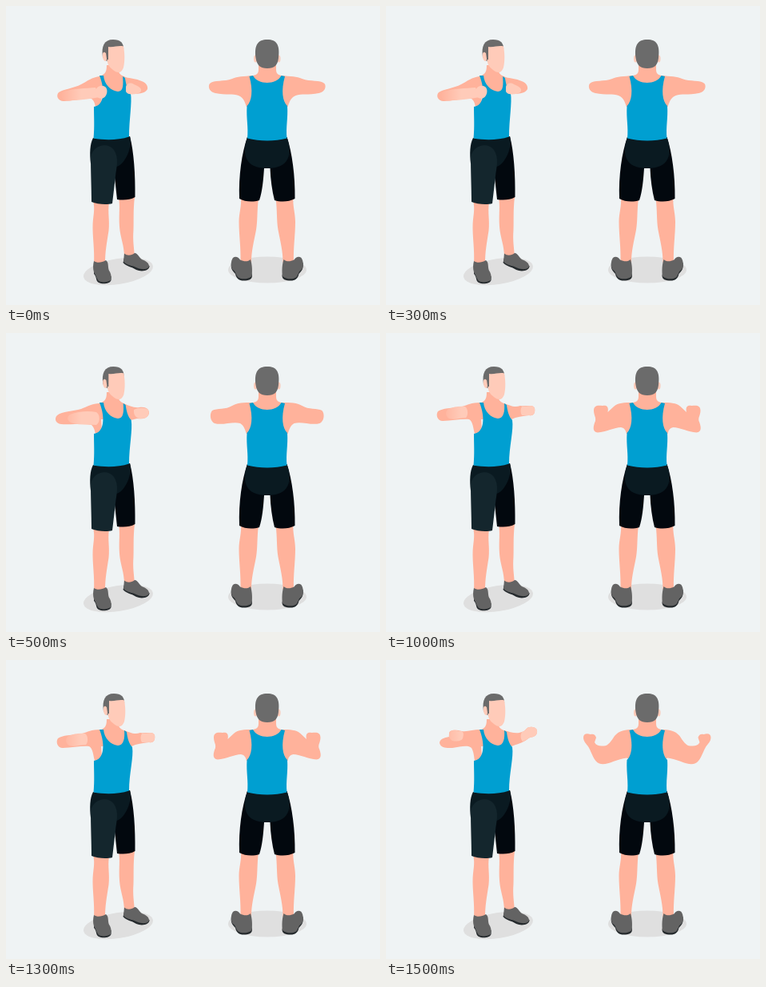
Animation of 468 by 374 pixels, one loop 2 s. Source, as an HTML page:

```html
<!DOCTYPE html>
<html lang="en">
<head>
<meta charset="utf-8">
<title>Elbow swing exercise</title>
<style>
html, body { margin: 0; width: 100%; height: 100%; overflow: hidden; background: #eff3f4; }
svg { display: block; width: 100vw; height: 100vh; }
.skin { fill: #ffb29b; }
.light { fill: #ffcbb9; }
.hair { fill: #6b6b6b; }
.shirt { fill: #009fd1; }
.dark { fill: #02080e; }
.band { fill: #0a1a21; }
.thigh { fill: #14262d; }
.shade { fill: #dfdfdf; }
.shoe { fill: #636363; }
.sole { fill: #252a2d; }
</style>
</head>
<body>
<svg viewBox="0 0 468 374">
  <defs>
    <linearGradient id="fade" gradientUnits="userSpaceOnUse" x1="68" y1="0" x2="94" y2="0">
      <stop offset="0" stop-color="#ffb29b"/><stop offset="1" stop-color="#ffcbb9"/>
    </linearGradient>
    <g id="backLeg">
      <path class="skin" d="M294 239L316 240C314 256 315 268 313 280C310 296 307 306 307 321L293.500 319C294 302 291.500 286 291.500 270C291.500 259 295 250 294 239Z"/>
      <path class="sole" d="M282 321C281 328 283 331 287 335C288 341 292 343.500 297 343.500C304 343.500 308 342 308 337L306 330Z"/>
      <path class="shoe" d="M284 315C287 312.500 291 314 293 317.500C298 320 303 320 306 317C308 323 308.500 332 307.500 338C303 342 294 342.500 290 339C287 335 288 333 284 330C281 327 281 319 284 315Z"/>
    </g>
    <path id="backArm" class="skin"/>
  </defs>

  <g id="front">
    <ellipse class="shade" cx="140.500" cy="332" rx="44" ry="16" transform="rotate(-9 140.500 332)"/>
    <path class="skin" d="M141 239H161C159 255 160 268 159.500 280C158.500 293 160 301 161 313L148 314C148 299 143 290 142 276C141 260 143 251 141 239Z"/>
    <path class="skin" d="M109 244L129 246C127 258 130 268 128.500 281C126 297 124 308 124 322L110 322C111 306 108.500 291 108.500 277C108.500 263 112 255 109 244Z"/>
    <path class="sole" d="M148 315L146.500 321C151 326 157 326 163 330C170 333 180 331 179.500 325Z"/>
    <path class="shoe" d="M148 309.500C152 313 157 312 161 309C165 309.500 166 314 170 317C175 319 179 321 179 326C177 330 170 330 164 327.500C158 324 151 325 147 319.500Z"/>
    <path class="sole" d="M110 330V335C114 339 112 344 116 346C121 348.500 130 347.500 131.500 343V338Z"/>
    <path class="shoe" d="M110 319C114 322 120 321 125 318C129 321 127 326 129 331C132 335 132 340 131 343C127 346 119 346 116 344C113 341 113 337 110 333C108.500 328 109 323 110 319Z"/>

    <path class="dark" d="M112 165L155 163C160 182 162 212 161.500 239C155 243 146 243 139 242L135 205Z"/>
    <path class="band" d="M109 165C122 168 142 167 155 163C157 170 155 182 150 190C147 195 143 200 138 201L106 197C104.500 185 105 172 109 165Z"/>
    <path class="thigh" d="M106 189C109 173 128 170 135 180C142 190 138 203 137 213L133 247C126 249 114 248 107 245C107 228 106 207 106 189Z"/>

    <path id="farArm" class="skin"/>
    <path id="nearArm" class="skin"/>
    <path class="skin" d="M126 74H141V82C142 86 146 87 151 90L153 108H118L116 88C123 86 126 84 126 74Z"/>
    <path id="vest" class="shirt"/>
    <path id="farHand" class="light"/>
    <path id="nearHand" fill="url(#fade)"/>
    <path id="fist" class="light"/>

    <g id="head">
      <path class="hair" d="M121 64C119 50 123 42 134 42C143 42 148 46 147 56L130 67L126 69Z"/>
      <path class="light" d="M128 51C135 52 141 49 147 50.500C148.500 58 149 69 147 77C144 85 139 84 134 80C129 76 127 73 126.500 67H128Z"/>
      <path class="light" d="M125 59C121 55 120 61 121.500 66C123 70 125.500 70 126 66Z"/>
    </g>
  </g>

  <g id="back">
    <ellipse class="shade" cx="327" cy="330" rx="49" ry="16.500"/>
    <use href="#backLeg"/>
    <use href="#backLeg" transform="matrix(-1 0 0 1 653.500 0)"/>
    <path class="dark" d="M302 164H351.500C358 183 362 213 361.500 241C354 245 344 245.500 336 243C333 231 331 217 330.500 203H323C322 217 321 231 317 243C309 245.500 299 245 292 241C291 212 295 184 302 164Z"/>
    <path class="band" d="M302 164H351.500C359 186 354 203 327 203C299 203 295 186 302 164Z"/>
    <use href="#backArm"/>
    <use href="#backArm" transform="matrix(-1 0 0 1 653.500 0)"/>
    <path class="skin" d="M316 70H338V80C338 86 343 87 349 88V104H304V88C311 87 316 86 316 80Z"/>
    <path class="shirt" d="M304.500 88L309 87C315 99 338.500 99 344.500 87L349 88C344 106 346 119 352 125C353 141 350 151 351.500 165.500C336 169.500 318 169.500 302 165.500C303.500 151 300.500 141 301.500 125C307.500 119 309.500 106 304.500 88Z"/>
    <ellipse class="light" cx="312.200" cy="66" rx="2.200" ry="4.500"/>
    <ellipse class="light" cx="341.300" cy="66" rx="2.200" ry="4.500"/>
    <path class="hair" d="M312.500 65C310.500 49 315 42 327 42C339 42 343 49 341 65C340 74 336 78 327 78C318 78 314 74 312.500 65Z"/>
  </g>
</svg>
<script>
const LOOP = 2000, HOLD = 500;
const el = id => document.getElementById(id);

const together = {
  lean: 0,
  nearArm: "M118 88C107 89 102 94 94 98C85 103 71 104 66 108C62 112 65 119 72 119C86 119 98 114 107 116C111 119 111 123 112 126L120 124Z",
  nearHand: "M72 107C84 103 101 103 112 102L117 114C104 116 89 119 75 118C68 117 68 110 72 107Z",
  fist: "M112 106C113 101 119 98 124 101C128 104 127 112 122 115C117 117 111 114 112 106Z",
  farArm: "M147 88C154 91 160 90 167 93C175 95 178 100 177 104C174 110 163 111 155 108L148 106Z",
  farHand: "M150 102C150 97 156 95 160 98C165 100 172 103 168 108C163 111 152 112 150 107Z",
  backArm: "M310 87C296 88 290 88 283 91C273 95 260 92 255 97C252 101 255 108 262 109C275 112 284 109 291 112C298 115 299 121 301 126L312 126Z"
};
const crossing = {
  lean: .7,
  nearArm: "M118 88C107 88 102 92 94 95C84 98 70 98 64 103C60 107 62 113 69 114C83 115 98 112 107 115C111 119 111 123 112 126L120 124Z",
  nearHand: "M80 102C90 98 103 97 113 99C118 102 118 112 113 115C102 114 91 116 81 112C76 109 76 105 80 102Z",
  fist: "",
  farArm: "M147 88C154 91 160 94 167 93C175 92 179 95 179 100C178 107 170 108 164 107L156 109L148 106Z",
  farHand: "M160 96C166 93 174 93 178 96C180 102 177 107 170 107C165 108 159 104 160 96Z",
  backArm: "M310 87C296 87 290 87 283 91C275 96 264 94 258 97C254 102 256 111 261 113C271 116 284 110 293 113C298 116 299 121 301 126L312 126Z"
};
const raised = {
  lean: 2,
  nearArm: "M118 87C107 87 102 90 95 92C83 94 70 94 65 98C62 102 64 110 71 110C83 110 95 107 104 108C109 111 109 119 111 126L120 124Z",
  nearHand: "M78 95C85 92 93 91 99 92C103 95 103 103 100 106C93 106 86 109 79 107C74 104 74 98 78 95Z",
  fist: "",
  farArm: "M147 88C155 90 160 94 168 91C175 92 184 89 186 94C187 100 185 104 179 103C171 104 163 105 157 108L148 106Z",
  farHand: "M170 92C177 92 184 89 186 94C187 101 184 104 179 103H170C168 100 168 95 170 92Z",
  backArm: "M310 87C297 87 291 87 285 92L277.500 99C279 92 276 90 271 91C264 90 260 91 260 97C260 103 263 105 262 110C259 117 258 124 265 124.500C275 124 286 118 294 118C299 119 300 122 301 126L312 126Z"
};
const open = {
  lean: 2,
  nearArm: "M118 87C109 87 102 90 95 89C87 87 79 87 79 92L79 96C73 97 67 99 67 104C69 111 77 110 83 110C94 108 103 106 107 110C110 115 110 121 111 126L120 124Z",
  nearHand: "M79 93C80 87 87 87 91 89C97 88 98 92 96 98C94 102 87 102 83 101C80 99 78 96 79 93Z",
  fist: "",
  farArm: "M147 88C156 90 163 93 170 90C175 89 175 84 180 84C186 83 190 86 189 91C187 98 181 95 177 99C171 104 164 105 157 108L148 106Z",
  farHand: "M170 90C175 89 175 84 180 84C186 83 190 86 189 91C187 98 181 95 177 99L171 102C168 98 168 94 170 90Z",
  backArm: "M310 87C299 87 292 88 286 95C282 101 278 108 272 107.500C267 108 263 107 261 103L263 97C262 93 259 92 256 93C250 91 247 93 247 97C247 102 251 105 253.500 109C258 117 260 127 267 129.500C275 133 288 124 301 122.500L312 126Z"
};
const poses = [together, crossing, raised, open];
const parts = ["nearArm", "nearHand", "fist", "farArm", "farHand", "backArm"];

function vest(lean) {
  const x = n => n + lean;
  return `M117 87L122 87C123 98 131 106 140 107C147 107 ${x(147)} 98 ${x(146)} 88L${x(149)} 90`
    + `C${x(150)} 98 ${x(152)} 105 ${x(156)} 109C${x(158)} 121 154 142 154 163.500`
    + "C141 168 123 168 109.500 165.500C111 151 110 139 110 126C122 125 125 107 117 87Z";
}

let shown;
function draw(ms) {
  const pose = poses[Math.floor(ms % LOOP / HOLD)];
  if (pose === shown) return;
  shown = pose;
  for (const id of parts) el(id).setAttribute("d", pose[id]);
  el("vest").setAttribute("d", vest(pose.lean));
  el("head").setAttribute("transform", `translate(${pose.lean / 2} 0)`);
}

const start = performance.now();
function tick() {
  draw(performance.now() - start);
  requestAnimationFrame(tick);
}
tick();
</script>
</body>
</html>
```
